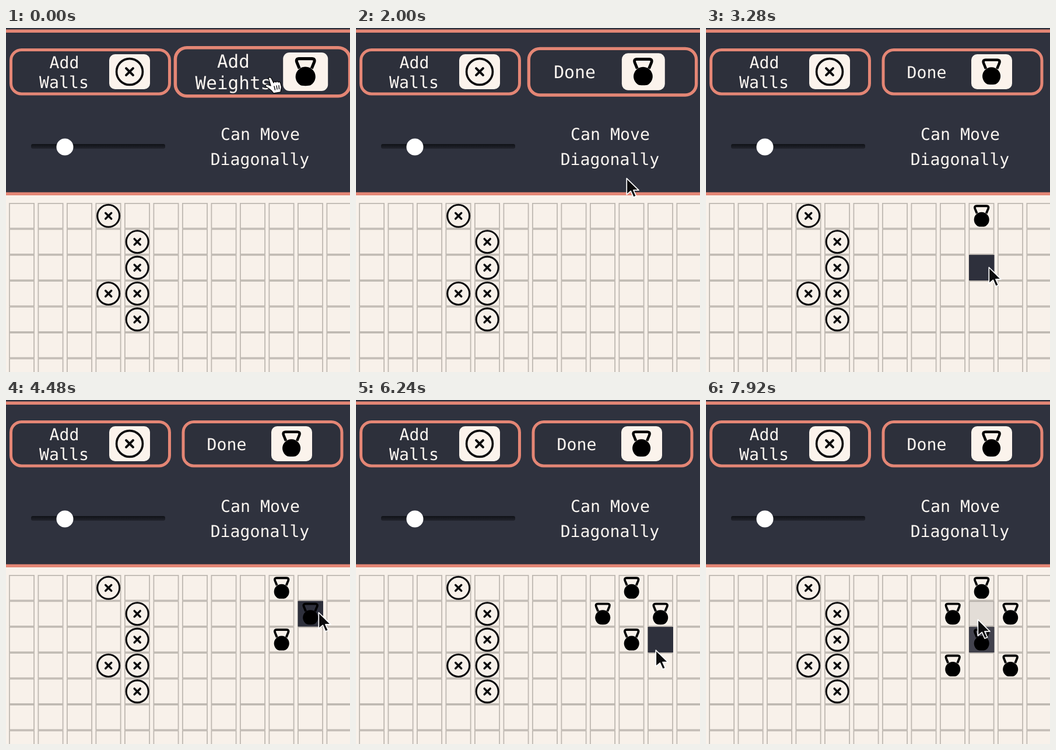
Animation, 590 px wide and 590 px high, one loop 8000 ms. Source, as an HTML page:

```html
<!DOCTYPE html>
<html lang="en">
<head>
<meta charset="utf-8">
<title>Grid weights</title>
<style>
  html, body { margin: 0; width: 100%; height: 100%; overflow: hidden; background: #2f323e; }
  svg { display: block; width: 100vw; height: 100vh; }
  text { font: 28.2px "DejaVu Sans Mono", monospace; fill: #fbf6f1; text-anchor: middle; text-rendering: geometricPrecision; }
</style>
</head>
<body>
<svg viewBox="0 0 590 590">
  <defs>
    <linearGradient id="groove" x2="0" y2="1">
      <stop offset="0" stop-color="#101217"/>
      <stop offset="1" stop-color="#22242d"/>
    </linearGradient>
    <g id="wall" fill="none" stroke="#0b0b0d">
      <circle r="19" stroke-width="3.1"/>
      <path d="M-5-5 5 5M5-5-5 5" stroke-width="3.5" stroke-linecap="round"/>
    </g>
    <g id="bell">
      <path d="M-9.5-5-13.4-14.5Q-15.6-20.3-10-20.3H10Q15.6-20.3 13.4-14.5L9.5-5" fill="none" stroke="#000" stroke-width="4.6"/>
      <path d="M-8 21A15.5 15.5 0 1 1 8 21Q6 22 0 22T-8 21Z"/>
    </g>
    <rect id="frame" x="-136" y="-38" width="272" height="75.4" rx="18" fill="#2d303b" stroke="#e48675" stroke-width="5"/>
    <rect id="tile" x="-35" y="-30" width="70" height="60" rx="10" fill="#fbf3ec"/>
  </defs>

  <rect width="590" height="590" fill="#2f323e"/>
  <rect y="2.5" width="590" height="5.5" fill="#e48675"/>
  <rect y="281.7" width="590" height="5.5" fill="#e48675"/>
  <rect y="287" width="590" height="303" fill="#f8f1ea"/>

  <use href="#frame" x="144.5" y="75.5"/>
  <text x="100" y="69">Add</text>
  <text x="99.5" y="102.5">Walls</text>
  <use href="#tile" x="212" y="75"/>
  <use href="#wall" transform="translate(212 75) scale(1.18)"/>

  <g id="button">
    <use href="#frame" x="440" y="75.5"/>
    <g id="add">
      <text x="394.5" y="69">Add</text>
      <text x="394.5" y="102.5">Weights</text>
      <use href="#tile" x="507" y="75"/>
      <use href="#bell" x="507" y="75"/>
    </g>
    <g id="done">
      <text x="378.5" y="85.5">Done</text>
      <use href="#tile" x="490" y="75"/>
      <use href="#bell" x="489.6" y="75"/>
    </g>
  </g>

  <rect x="43" y="199" width="230" height="8" rx="3" fill="url(#groove)"/>
  <circle cx="101" cy="204" r="14.5" fill="#fff"/>
  <text x="436" y="192">Can Move</text>
  <text x="435.5" y="235">Diagonally</text>

  <g id="grid"></g>
  <g id="items"></g>

  <path id="arrow" d="M-.7 .5V28.2L6.3 22.4 11 33 15.6 31 11 20.8H20Z" fill="#0b0b0d" stroke="#fff" stroke-width="1.7" stroke-linejoin="round"/>
  <g id="hand" stroke="#0b0b0d" stroke-width="1.4" stroke-linejoin="round" stroke-linecap="round">
    <path d="M-3 1Q-1-2 2 1L6 9Q7 5 10 8Q12 5 14 8Q17 6 18 10L19.5 16Q19 20 18 25L6 27Q3 22-2 19L-8 15Q-8 11-4 12L1 14Z" fill="#fff"/>
    <path d="M7 15l1.5 6M11 14l1 6M15 13.5l.5 6" fill="none"/>
  </g>
</svg>
<script>
const LOOP = 8000, STEP = 80, FADE = 200;
const LEFT = 5, TOP = 300, COL = 49.5, ROW = 44.4, CELL_W = 44;
const BUTTON_CLICK = 720, BUTTON_LEAVE = 1900;
const SVG = 'http://www.w3.org/2000/svg';
const $ = id => document.getElementById(id);

const speedUp = k => k * k;
const slowDown = k => 1 - (1 - k) ** 3;
const smooth = k => k * k * (3 - 2 * k);
const progress = (t, from, to) => Math.min(1, Math.max(0, (t - from) / (to - from)));

const wallMap = ['   x', '    x', '    x', '   xx', '    x'];
const origin = { x: 453, y: 85 };
// Pointer moves; different easings on x and y bend the way.
const moves = [
  { from: 1520, to: 1600, x: 464, y: 105 },
  { from: 1880, to: 2270, x: 474, y: 333, easeX: speedUp, easeY: slowDown },
  { from: 2800, to: 3230, x: 486, y: 410 },
  { from: 3680, to: 4160, x: 537, y: 364 },
  { from: 4560, to: 5360, x: 434, y: 361 },
  { from: 5600, to: 6300, x: 515, y: 442, easeX: slowDown, easeY: speedUp },
  { from: 6480, to: 7285, x: 425, y: 447 },
  { from: 7560, to: 7925, x: 467, y: 374, easeX: slowDown, easeY: speedUp }
];
const cellClicks = [2640, 3600, 4480, 5440, 6400, 7440];

function pointer(t) {
  let { x, y } = origin;
  for (const move of moves) {
    const k = progress(t, move.from, move.to);
    x += (move.x - x) * (move.easeX || smooth)(k);
    y += (move.y - y) * (move.easeY || smooth)(k);
  }
  return { x, y };
}

function cellAt({ x, y }) {
  const col = Math.floor((x - LEFT) / COL), row = Math.floor((y - TOP) / ROW);
  const inside = row >= 0 && x - LEFT - col * COL <= CELL_W + 1;
  return inside ? { col, row } : null;
}

function add(parent, tag, attrs) {
  const node = document.createElementNS(SVG, tag);
  for (const key in attrs) node.setAttribute(key, attrs[key]);
  return parent.appendChild(node);
}

function place(id, { col, row }, scale) {
  const x = LEFT + col * COL + 22.2, y = TOP + row * ROW + 22.3;
  return add($('items'), 'use', { href: id, transform: `translate(${x} ${y}) scale(${scale})` });
}

const shades = {};
for (let row = 0; row < 7; row++) {
  for (let col = 0; col < 12; col++) {
    const x = LEFT + col * COL, y = TOP + row * ROW;
    add($('grid'), 'rect', {
      x: x + .9, y: y + .9, width: CELL_W - 1.8, height: ROW - 1.8,
      fill: 'none', stroke: '#beb8b1', 'stroke-width': 1.8
    });
    shades[col + ',' + row] = add($('grid'), 'rect', {
      x: x + .5, y: y + .3, width: CELL_W - .5, height: ROW - .3, fill: '#2e303c', opacity: 0
    });
  }
}
wallMap.forEach((line, row) => [...line].forEach((mark, col) => {
  if (mark === 'x') place('#wall', { col, row }, 1);
}));
const bells = cellClicks.map(time => ({ time, node: place('#bell', cellAt(pointer(time)), .84) }));

// Share of the last FADE milliseconds that the pointer spent on each cell.
function hoverShares(t) {
  const shares = {}, samples = 25;
  for (let i = 0; i < samples; i++) {
    const cell = cellAt(pointer(t - i * FADE / samples));
    if (!cell) continue;
    const id = cell.col + ',' + cell.row;
    shares[id] = (shares[id] || 0) + 1 / samples;
  }
  return shares;
}

const show = (node, on) => node.setAttribute('visibility', on ? 'visible' : 'hidden');

function draw(t) {
  const scale = 1 + .1 * (1 - progress(t, BUTTON_LEAVE, BUTTON_LEAVE + 400)) ** 2;
  $('button').setAttribute('transform', `translate(440 75.5) scale(${scale}) translate(-440 -75.5)`);
  show($('add'), t < BUTTON_CLICK);
  show($('done'), t >= BUTTON_CLICK);

  const shares = hoverShares(t);
  for (const id in shades) shades[id].setAttribute('opacity', smooth(shares[id] || 0));
  for (const { time, node } of bells) show(node, t >= time);

  const { x, y } = pointer(t);
  for (const id of ['arrow', 'hand']) {
    $(id).setAttribute('transform', `translate(${x} ${y})`);
    show($(id), (id === 'hand') === (t < BUTTON_LEAVE));
  }
}

const start = performance.now();
function tick() {
  const t = (performance.now() - start) % LOOP;
  draw(Math.floor(t / STEP) * STEP);
  requestAnimationFrame(tick);
}
tick();
</script>
</body>
</html>
```
